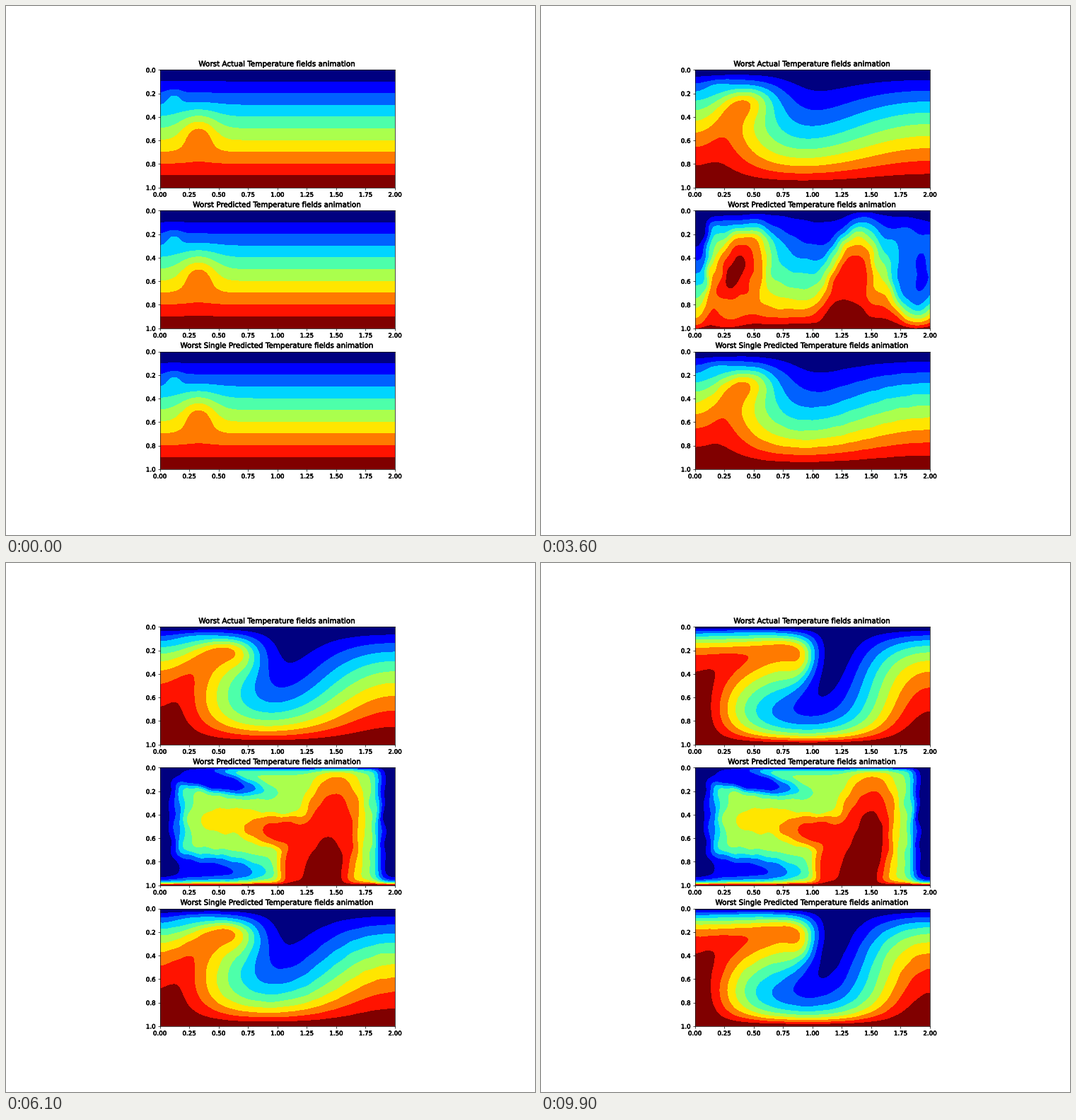
These frames come from a looping animation (748x748 px, 10000 ms). A matplotlib script:

```python
import numpy as np
import matplotlib.pyplot as plt
from matplotlib.animation import FuncAnimation
from matplotlib.patheffects import withStroke

SIZE, DPI = 748, 64
FRAMES, STEP = 100, 100
RAYLEIGH = 3e5
COLORS = plt.cm.jet(np.linspace(0, 1, 10))
LEVELS = [-9, *np.arange(1, 10) / 10, 9]
TITLES = ["Worst Actual Temperature fields animation",
          "Worst Predicted Temperature fields animation",
          "Worst Single Predicted Temperature fields animation"]

# ---- convection in a 2 x 1 box: T = depth + sum a cos(kx) sin(ny) ----
NX, NY = 128, 64
x = (np.arange(NX) + .5) * 2 / NX
y = (np.arange(NY) + .5) / NY
k = np.pi / 2 * np.arange(64)
n = np.pi * np.arange(1, 41)
K, N = k[:, None], n[None, :]
Q = K**2 + N**2
cx, sx = np.cos(np.outer(k, x)), np.sin(np.outer(k, x))
cy, sy = np.cos(np.outer(n, y)), np.sin(np.outer(n, y))
weight = np.where(K == 0, 1, 2) / NX


def project(f):
    return (weight * cx) @ f @ sy.T * 2 / NY


def rate(a):
    """Time derivative of the modes, and the top speed of the flow."""
    v = cx.T @ (-a * K**2 / Q**2) @ sy
    u = sx.T @ (a * K * N / Q**2) @ cy
    tx = sx.T @ (-a * K) @ sy
    ty = cx.T @ (a * N) @ cy
    return project(-u * tx - v * (1 + ty)) - Q * a / RAYLEIGH, np.hypot(u, v).max()


def bump(amp, x0, y0, wx, wy):
    return amp * np.exp(-((x[:, None] - x0) / wx)**2 / 2 - ((y - y0) / wy)**2 / 2)


def cold_depth(a):
    """Depth reached by the sinking T = 0.2 line."""
    return np.interp(.2, np.maximum.accumulate((y + cx.T @ a @ sy).min(axis=0)), y)


def simulate():
    a = project(bump(.19, .33, .54, .105, .11) + bump(.03, .33, .4, .16, .1)
                + bump(.08, .12, .235, .05, .05))
    states, depths = [a], [cold_depth(a)]
    while depths[-1] < .78 and len(states) < 500:
        k1, speed = rate(a)
        dt = .008 / speed
        k2 = rate(a + dt / 2 * k1)[0]
        k3 = rate(a + dt / 2 * k2)[0]
        k4 = rate(a + dt * k3)[0]
        a = a + dt / 6 * (k1 + 2 * k2 + 2 * k3 + k4)
        states.append(a)
        depths.append(max(cold_depth(a), depths[-1] + 1e-9))
    return states, depths


STATES, DEPTHS = simulate()

# ---- display grid ----
gx, gy = np.linspace(0, 2, 201), np.linspace(0, 1, 151)
GX, GY = np.meshgrid(gx, gy)
show_x, show_y = np.cos(np.outer(gx, k)), np.sin(np.outer(n, gy))


def convection(t):
    depth = np.interp(t, [0, 1, 2, 3.6, 5.2, 7.7, 9.9],
                      [.2, .227, .265, .345, .455, .63, .762])
    pos = np.interp(depth, DEPTHS, np.arange(len(DEPTHS)))
    i = min(int(pos), len(STATES) - 2)
    a = STATES[i] + (pos - i) * (STATES[i + 1] - STATES[i])
    return GY + (show_x @ a @ show_y).T


# ---- runaway prediction: twin plumes that turn into one hot column ----
def stir(field, temp, x0, y0, rx, ry, lean=0, dip=0, amount=1):
    """Pull a soft ellipse of the field towards temp."""
    u = (GX - x0 - lean * (GY - y0)) / rx
    v = (GY - y0 - dip * (GX - x0)) / ry
    return field + amount * np.exp(-(u**2 + v**2)**2) * (temp - field)


def edge(v, width):
    return 1 / (1 + np.exp(-v / width))


def smooth(s):
    s = np.clip(s, 0, 1)
    return s * s * (3 - 2 * s)


def plumes(t):
    grow = min(t / 3.6, 1)
    f = convection(t)
    f = stir(f, GY - .2, 0, .5, .13, .6, amount=grow)
    f = stir(f, .2, 1.88, .55, .22, .38, amount=grow)
    f = stir(f, .84, .37, .62, .2, .43, lean=-.25, amount=grow)
    f = stir(f, .96, .34, .52, .09, .2, lean=-.3, amount=grow)
    f = stir(f, .84, 1.31, .65, .21, .5, lean=-.2, amount=grow)
    return stir(f, .97, 1.27, .95, .2, .2, amount=grow)


def column(t):
    rise = np.clip((t - 6) / 3.9, 0, 1)
    f = np.full_like(GX, .52)
    f = stir(f, .15, .25, .9, .65, .17)
    f = stir(f, .66, .62, .45, .34, .12)
    f = stir(f, .12, .42, .1, .45, .1, dip=.2)
    f = stir(f, .87, 1.43, .7, .28, .7, lean=-.12)
    f = stir(f, .82, 1.05, .54, .32, .14)
    f = stir(f, .87, 1.2, .85, .19, .3)
    f = stir(f, .97, 1.39, .95, .16, .33 + .27 * rise, lean=-.13 - .1 * rise)
    f = .03 + (f - .03) * edge(GX - .16, .04) * edge(1.86 - GX, .03)
    f = f * (1 - np.exp(-GY / .02))
    return f + (1 - f) * np.exp((GY - 1) / .025)


def runaway(t):
    mix = smooth((t - 3) / 3.1)
    early = plumes(t) if mix < 1 else 0
    return (1 - mix) * early + mix * column(t)


def ripple(seed):
    rng = np.random.default_rng(seed)
    waves = zip(rng.uniform(10, 55, 14), rng.uniform(-30, 30, 14), rng.uniform(0, 6.3, 14))
    return sum(np.sin(a * GX + b * GY + c) for a, b, c in waves) / 14**.5 * np.sin(np.pi * GY)


RIPPLES = ripple(3), ripple(8)


def roughen(temp, noise, amp):
    ty, tx = np.gradient(temp, gy, gx)
    return temp + amp * noise * np.hypot(tx, ty)


def fields(t):
    true = convection(t)
    grow = min(t / 2, 1)
    return (true, roughen(runaway(t), RIPPLES[0], .011 * grow),
            roughen(true, RIPPLES[1], .003 * grow))


# ---- figure ----
UNIT = SIZE / 12 / DPI
plt.rcParams.update({
    "font.family": "DejaVu Sans", "font.size": 10 * UNIT,
    "axes.linewidth": .8 * UNIT, "axes.titlepad": 6 * UNIT,
    **{f"{a}tick.major.{p}": v * UNIT for a in "xy"
       for p, v in (("size", 3.5), ("width", .8), ("pad", 3.5))},
})
fig = plt.figure(figsize=(SIZE / DPI, SIZE / DPI), dpi=DPI, facecolor="white")
heavy = [withStroke(linewidth=.6, foreground="black")]
axes = []
for row, title in enumerate(TITLES):
    bottom = SIZE - 90.4 - 199.1 * row - 166.2
    ax = fig.add_axes([217.5 / SIZE, bottom / SIZE, 332.5 / SIZE, 166.2 / SIZE])
    ax.set(xlim=(0, 2), ylim=(1, 0), xticks=np.arange(0, 2.1, .25),
           yticks=np.arange(0, 1.1, .2), title=title)
    ax.xaxis.set_major_formatter("{x:.2f}")
    ax.yaxis.set_major_formatter("{x:.1f}")
    for text in [ax.title, *ax.get_xticklabels(), *ax.get_yticklabels()]:
        text.set_path_effects(heavy)
    axes.append(ax)
drawn = []


def update(i):
    while drawn:
        drawn.pop().remove()
    for ax, temp in zip(axes, fields(i * STEP / 1000)):
        drawn.append(ax.contourf(gx, gy, temp, levels=LEVELS, colors=COLORS))
        ax.set(xlim=(0, 2), ylim=(1, 0))
    return drawn


anim = FuncAnimation(fig, update, frames=FRAMES, interval=STEP, repeat=True,
                     repeat_delay=0, blit=False)
plt.show()
```
